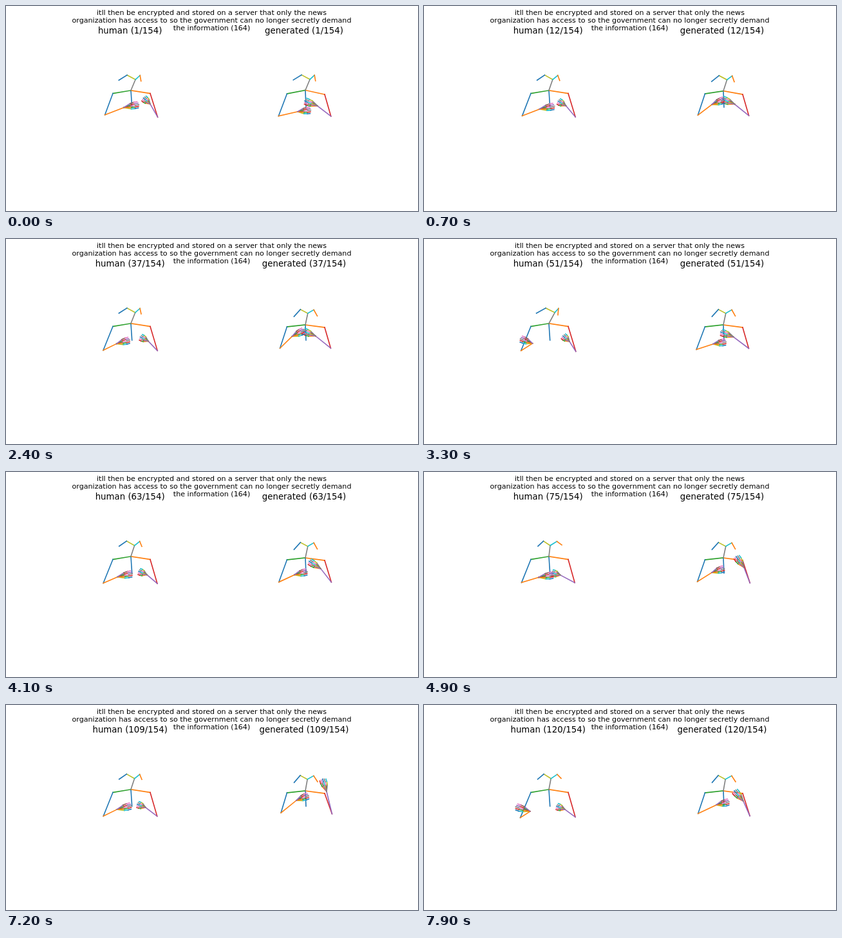
Write an HTML page that moves like this. It is 640 px wide and 320 px high and loops after 8000 ms.

```html
<!DOCTYPE html>
<html lang="en">
<head>
<meta charset="utf-8">
<style>
  html, body { margin: 0; width: 100%; height: 100%; overflow: hidden; background: #fff; }
  svg { display: block; width: 640px; height: 320px; }
  text { font-family: "DejaVu Sans", sans-serif; text-anchor: middle; fill: #000; }
  .caption { font-size: 11.14px; }
  .title { font-size: 13.33px; }
  line { stroke-width: 1.6; stroke-linecap: square; }
</style>
</head>
<body>
<svg id="stage" viewBox="0 0 640 320">
  <g class="caption">
    <text x="319.5" y="14">itll then be encrypted and stored on a server that only the news</text>
    <text x="319.5" y="26">organization has access to so the government can no longer secretly demand</text>
    <text x="319.5" y="38">the information (164)</text>
  </g>
</svg>
<script>
const LOOP = 8000, STEP = 100, TOTAL = 154, SPREAD = 10;
const COLORS = ['#1f77b4', '#ff7f0e', '#2ca02c', '#d62728', '#9467bd',
                '#8c564b', '#e377c2', '#7f7f7f', '#bcbd22', '#17becf'];
const KEY_TIMES = [0, 1500, 3300, 4900, 5900, 7200, 7900];

// Each arm hangs from its shoulder; the wrist visits one point per key time.
// inward: x direction towards the body; lift: how far a raised wrist draws the elbow in.
const figures = [
  {
    label: 'human', x: 192.7, neck: [194, 131.8], spine: [195.7, 158], sink: 0,
    turns: [0.85, 0.4, 1.2, 0, 0.2, 0.6, 0.2],
    left: {
      shoulder: [166, 136.5], elbow: [151.5, 172.5], home: [179, 165], inward: 1, lift: 0.25, hand: 22,
      wrists: [[183, 158.5], [175, 164], [168.5, 163], [178, 164.5], [171, 165], [172.5, 163], [165, 166]]
    },
    right: {
      shoulder: [224, 136.5], elbow: [235, 174.8], home: [219, 163], inward: -1, lift: 0, hand: 13,
      wrists: [[224, 153], [216, 159], [226, 160], [212, 161], [221, 163], [217, 160], [219, 163]]
    }
  },
  {
    label: 'generated', x: 463, neck: [465, 131.5], spine: [466, 158], sink: 2.5,
    turns: [0.85, 0.3, 0.3, 0.3, 0.3, 0.2, 0.2],
    left: {
      shoulder: [436.5, 137], elbow: [423, 172.5], home: [450, 165], inward: 1, lift: 0.25, hand: 19,
      wrists: [[453, 165], [440, 140], [449, 164], [447, 157], [460, 143], [451, 149], [454, 156]]
    },
    right: {
      shoulder: [495, 138], elbow: [505.5, 172.5], home: [490, 152], inward: -1, lift: 0, hand: 20,
      wrists: [[484, 156], [481, 150], [481, 153], [497, 149], [508, 143], [498, 135], [496, 150]]
    }
  }
];

const stage = document.getElementById('stage');
const mix = (a, b, u) => a + (b - a) * u;
const smooth = u => u * u * (3 - 2 * u);
const progress = (time, from, to) => smooth(Math.min(1, (time - from) / (to - from)));

function add(tag, attrs) {
  const node = document.createElementNS('http://www.w3.org/2000/svg', tag);
  for (const key in attrs) node.setAttribute(key, attrs[key]);
  return stage.appendChild(node);
}

function sample(values, time) {
  let i = 0;
  while (i < KEY_TIMES.length - 2 && time >= KEY_TIMES[i + 1]) i++;
  const u = progress(time, KEY_TIMES[i], KEY_TIMES[i + 1]);
  const [a, b] = [values[i], values[i + 1]];
  return Array.isArray(a) ? a.map((v, k) => mix(v, b[k], u)) : mix(a, b, u);
}

function headBones(neck, turn, nod) {
  const at = (x, y) => [neck[0] + x, neck[1] + y];
  const nose = at(2 + 6 * turn, -17 - nod / 3);
  const eyeL = at(-8.5 + 3 * turn, -24), eyeR = at(12.5 + 2 * turn, -23.5);
  const earL = at(-17 - 2 * turn, -16 + nod), earR = at(20 - 5 * turn, -18 + 4 * turn + nod);
  return [[neck, nose], [nose, eyeL], [nose, eyeR], [eyeL, earL], [eyeR, earR]];
}

// Fingers run parallel from spread knuckles: index, middle, little, ring, thumb.
function handBones(wrist, hand) {
  const length = Math.hypot(...hand) || 1;
  const down = (hand[0] < 0 ? -SPREAD : SPREAD) / length;
  return [1, 2, 4, 3, 0].flatMap(slot => {
    const offset = (slot / 4 - 0.5) * down;
    const reach = 1.08 - 0.04 * Math.abs(slot - 2);
    const joint = (along, across) => [
      wrist[0] + hand[0] * along * reach - hand[1] * offset * across,
      wrist[1] + hand[1] * along * reach + hand[0] * offset * across];
    const joints = [joint(0, 0), joint(0.5, 0.85), joint(0.77, 1), joint(1, 1)];
    return [0, 1, 2].map(j => [joints[j], joints[j + 1]]);
  });
}

// The elbow trails the wrist, and the hand continues the forearm at a flatter angle.
// Beyond a limit the palm turns outward.
function armBones(arm, time) {
  const wrist = sample(arm.wrists, time);
  const dx = wrist[0] - arm.home[0], dy = wrist[1] - arm.home[1];
  const inside = dx * arm.inward;
  const elbow = [
    arm.elbow[0] + 0.12 * dx - arm.lift * dy * arm.inward,
    arm.elbow[1] + 0.25 * dy - 0.22 * inside];
  const fx = wrist[0] - elbow[0], fy = (wrist[1] - elbow[1]) * 0.5;
  const scale = arm.hand / Math.hypot(fx, fy);
  const hand = [fx * scale * Math.tanh((inside + 9) * 0.8), fy * scale];
  return [[arm.shoulder, elbow], [elbow, wrist], ...handBones(wrist, hand)];
}

function skeleton(figure, time) {
  const { left, right, spine } = figure;
  const sink = figure.sink * progress(time, 0, KEY_TIMES[1]);
  const neck = [figure.neck[0], figure.neck[1] + sink];
  return [
    [spine, neck], [neck, right.shoulder], [neck, left.shoulder],
    ...armBones(right, time), ...armBones(left, time),
    ...headBones(neck, sample(figure.turns, time), sink * 1.2)
  ];
}

for (const figure of figures) {
  figure.title = add('text', { class: 'title', x: figure.x, y: 43 });
  figure.lines = skeleton(figure, 0).map((_, i) => add('line', { stroke: COLORS[i % 10] }));
}

function draw(time) {
  const step = Math.floor(time / STEP);
  const count = 1 + Math.round(step * 1.5);
  for (const figure of figures) {
    figure.title.textContent = `${figure.label} (${count}/${TOTAL})`;
    skeleton(figure, step * STEP).forEach(([from, to], i) => {
      const line = figure.lines[i];
      line.setAttribute('x1', from[0]);
      line.setAttribute('y1', from[1]);
      line.setAttribute('x2', to[0]);
      line.setAttribute('y2', to[1]);
    });
  }
}

const start = performance.now();
function tick() {
  draw((performance.now() - start) % LOOP);
  requestAnimationFrame(tick);
}
tick();
</script>
</body>
</html>
```
